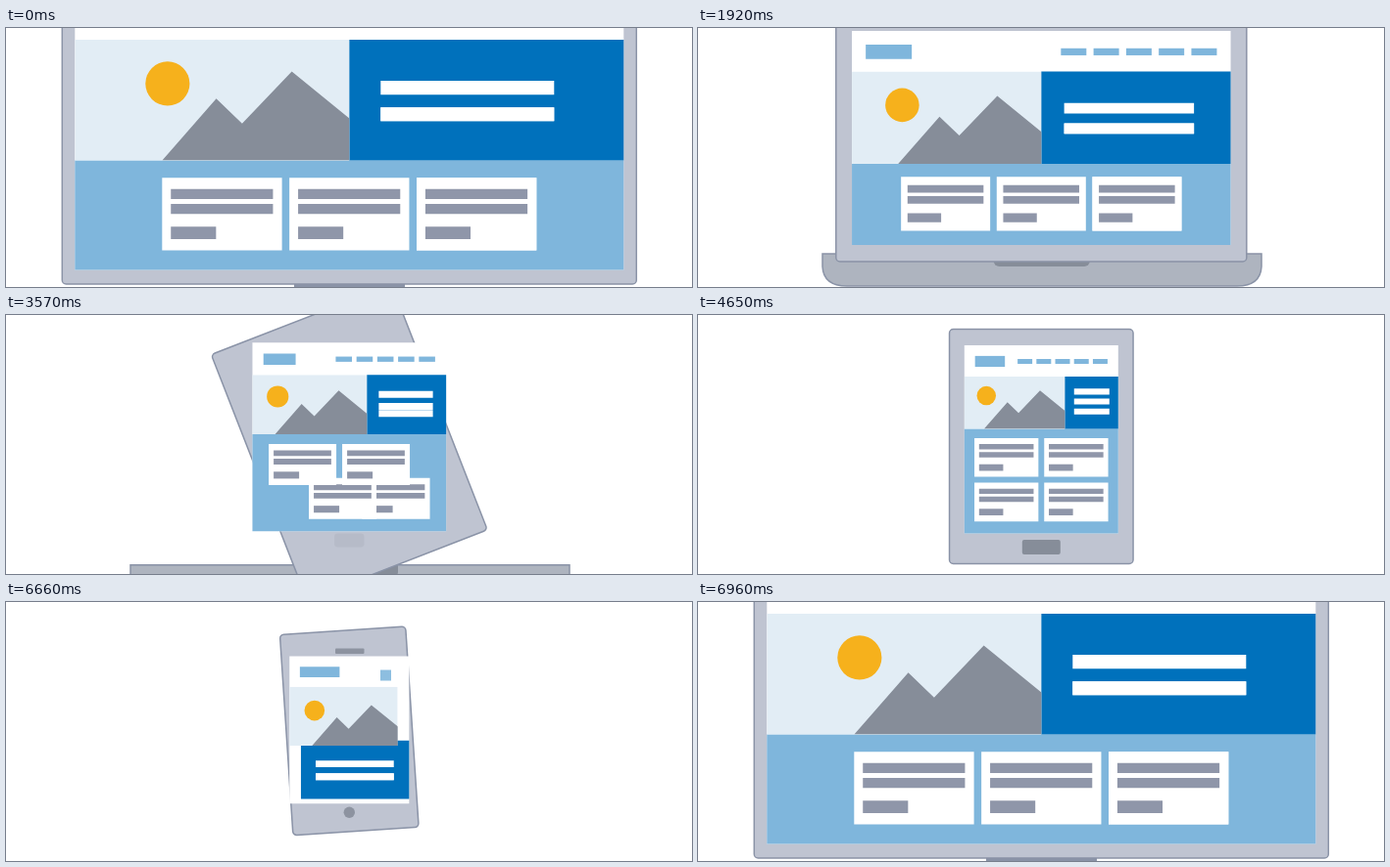
Write an HTML page with a canvas that moves like this. It is 700 px wide and 265 px high and loops after 7.05 s.

```html
<!DOCTYPE html>
<html lang="en">
<head>
<meta charset="utf-8">
<title>Responsive layout</title>
<style>
html, body { margin: 0; width: 100%; height: 100%; overflow: hidden; background: #fff; }
canvas { display: block; }
</style>
</head>
<body>
<canvas id="stage" width="700" height="265"></canvas>
<script>
const ctx = document.getElementById('stage').getContext('2d');
const LOOP = 7050, STEP = 30, CX = 350.3;

const color = {
  body: '#bfc4d1', edge: '#8a93a7', base: '#aeb4bf', dark: '#868d99', bar: '#8f96a9',
  sky: '#e2edf5', blue: '#0071bc', light: '#7fb6dc', sun: '#f6b11c', white: '#fff'
};

const easeIn = x => 1 - Math.cos(x * Math.PI / 2);
const easeOut = x => Math.sin(x * Math.PI / 2);

// Mixes numbers, and lists or objects of numbers
function blend(a, b, p) {
  if (typeof a === 'number') return a + (b - a) * p;
  if (Array.isArray(a)) return a.map((v, i) => blend(v, b[i], p));
  return Object.fromEntries(Object.keys(a).map(k => [k, blend(a[k], b[k], p)]));
}

// Places every part from a few measures; boxes are left, top, right, bottom.
// body: width, height, centre y; fold: how far the cards have moved to two columns
function layout({
  width, rows: [top, head, mid, bottom], split = .5, item, card, text, body, turn = 0, fold = 0,
  button = [215.3, 11.4, 11.4, 5.7], stand = 0, base = 0, handheld = 0, phone = 0
}) {
  const left = CX - width / 2, right = CX + width / 2, cut = left + width * split;
  const image = [left, head, cut, mid];
  const banner = phone ? [left, mid, right, bottom] : [cut, head, right, mid];

  const scale = Math.min(mid - head, (cut - left) * .52) / 124.2;
  const hills = [cut - 192 * scale, mid, scale];

  const headHeight = head - top, pad = headHeight * .34;
  const logo = [left + pad, top + pad, left + pad + 8 + item * 1.5, top + headHeight * .69];
  const nav = [right - pad - item * 6.12, top + headHeight * .515, item];

  const [bl, bt, br, bb] = banner, bw = br - bl, bh = bb - bt, extra = fold ** 2;
  const lines = [0, 1, 1 + extra].map(i => {
    const x = bl + 4 + bw * .1;
    const y = bt + bh * (.34 - .11 * extra + i * (.22 - .03 * extra));
    return [x, y, x + text, y + bh * .115];
  });

  const cardHeight = card * .607, gap = 4 + card * .029, pitch = card + gap;
  const cardsLeft = CX - ((3 - fold) * pitch - gap) / 2;
  const cards = [[2 - fold, fold], [2 - 2 * fold, fold], [0, 0], [1, 0]].map(([col, row]) =>
    [cardsLeft + col * pitch, mid + card * .145 + row * (cardHeight + gap), card, cardHeight]);

  return {
    screen: [left, top, right, bottom], panel: [left, mid, right, bottom],
    image, banner, hills, logo, nav, lines, cards, body, turn, button,
    stand, base, handheld, phone
  };
}

const desktop = layout({
  width: 560, rows: [-47, 12, 135.5, 247.5], item: 37.5, card: 122.3, text: 177,
  body: [586, 312, 106], stand: 1
});
const laptop = layout({
  width: 386.5, rows: [3, 44.5, 139, 222], item: 26, card: 91, text: 132.5,
  body: [419, 246, 116], base: 1
});
const tilted = layout({
  width: 286, rows: [22, 57.5, 134, 216.5], split: .517, item: 20, card: 77, text: 97,
  body: [333, 219, 120.7], turn: .25, fold: .22, base: 1
});
const tablet = layout({
  width: 157, rows: [31, 63, 116.5, 223.5], split: .653, item: 15, card: 65.3, text: 36,
  body: [240, 187.5, 134.5], turn: 1, fold: 1, button: [237.5, 39, 15, 2], handheld: 1
});
// Parts hidden on the phone keep their tablet places
const phone = {
  ...layout({
    width: 103, rows: [60, 90, 147.5, 204.5], split: 1, item: 21, card: 65.3, text: 75.5,
    body: [189, 120.5, 133], turn: 1, handheld: 1, phone: 1
  }),
  nav: tablet.nav, panel: tablet.panel, cards: tablet.cards
};

const moves = [
  { start: 1665, end: 1920, from: desktop, to: laptop, ease: easeOut },
  { start: 3105, end: 3390, from: laptop, to: tilted, ease: easeIn },
  { start: 3390, end: 3765, from: tilted, to: tablet, ease: easeOut },
  { start: 4995, end: 5280, from: tablet, to: phone, ease: easeOut },
  { start: 6652, end: 6953, from: phone, to: desktop, ease: easeOut }
];

function box(fill, [l, t, r, b], radius = 0) {
  ctx.fillStyle = fill;
  ctx.beginPath();
  ctx.roundRect(l, t, r - l, b - t, radius);
  ctx.fill();
}

// Parts appear only in the last stretch of a move
function show(amount, draw, threshold = .63) {
  if (amount <= threshold) return;
  ctx.globalAlpha = (amount - threshold) / (1 - threshold);
  draw();
  ctx.globalAlpha = 1;
}

function outlined(fill, path) {
  ctx.fillStyle = fill;
  ctx.strokeStyle = color.edge;
  ctx.lineWidth = 1.5;
  ctx.fill(path);
  ctx.stroke(path);
}

function drawBase(amount) {
  ctx.save();
  ctx.translate(0, 36 * (1 - amount));
  outlined(color.base, new Path2D('M127 231H575V244Q574 264 550 264H152Q128 264 127 244Z'));
  box(color.dark, [301.5, 231.5, 400, 244], [0, 0, 6, 6]);
  ctx.restore();
}

function drawBody([w, h, y], turn) {
  const path = new Path2D();
  path.roundRect(-w / 2, -h / 2, w, h, 4);
  ctx.save();
  ctx.translate(CX, y);
  ctx.rotate(turn * Math.PI / 2);
  outlined(color.body, path);
  ctx.restore();
}

function drawButton([y, w, h, radius]) {
  box(color.dark, [CX - w / 2, y - h / 2, CX + w / 2, y + h / 2], radius);
}

function drawCard([x, y, w, h]) {
  const bar = (top, wide, high) =>
    box(color.bar, [x + w * .073, y + h * top, x + w * (.073 + wide), y + h * (top + high)]);
  box(color.white, [x, y, x + w, y + h]);
  bar(.155, .852, .138);
  bar(.36, .852, .138);
  bar(.675, .377, .17);
}

function drawImage([l, t, r, b], [x, y, s]) {
  ctx.save();
  ctx.beginPath();
  ctx.rect(l, t, r - l, b - t);
  ctx.clip();
  box(color.sky, [l, t, r, b]);
  ctx.translate(x, y);
  ctx.scale(s, s);
  ctx.fillStyle = color.sun;
  ctx.beginPath();
  ctx.arc(5.5, -79, 22.7, 0, 7);
  ctx.fill();
  ctx.fillStyle = color.dark;
  ctx.fill(new Path2D('M0 0L55.5 -63.5L82 -38L133 -91.5L245 0Z'));
  ctx.restore();
}

function drawNav([x, y, w]) {
  const half = 1 + w * .1;
  for (let i = 0; i < 5; i++, x += w * 1.28) box(color.light, [x, y - half, x + w, y + half]);
}

function draw(t) {
  let v = desktop;
  for (const m of moves) {
    if (t < m.start) break;
    v = blend(m.from, m.to, m.ease(Math.min(1, (t - m.start) / (m.end - m.start))));
  }

  box(color.white, [0, 0, 700, 265]);
  show(v.stand, () => box(color.edge, [294, 262, 407, 265]));
  drawBase(v.base);
  drawBody(v.body, v.turn);
  show(v.handheld, () => drawButton(v.button));
  show(v.phone, () => box(color.dark, [336, 47.5, 365.5, 53], 1));

  box(color.white, v.screen);
  show(1 - v.phone, () => {
    box(color.light, v.panel);
    v.cards.forEach(drawCard);
  });
  box(color.blue, v.banner);
  for (const line of v.lines) box(color.white, line);
  drawImage(v.image, v.hills);
  box(color.light, v.logo);
  show(1 - v.phone, () => drawNav(v.nav), .44);
  show(v.phone, () => box(color.light, [382, 69.5, 393, 80.5]));
}

function tick() {
  const t = performance.now() % LOOP;
  draw(Math.floor(t / STEP) * STEP);
  requestAnimationFrame(tick);
}
tick();
</script>
</body>
</html>
```
